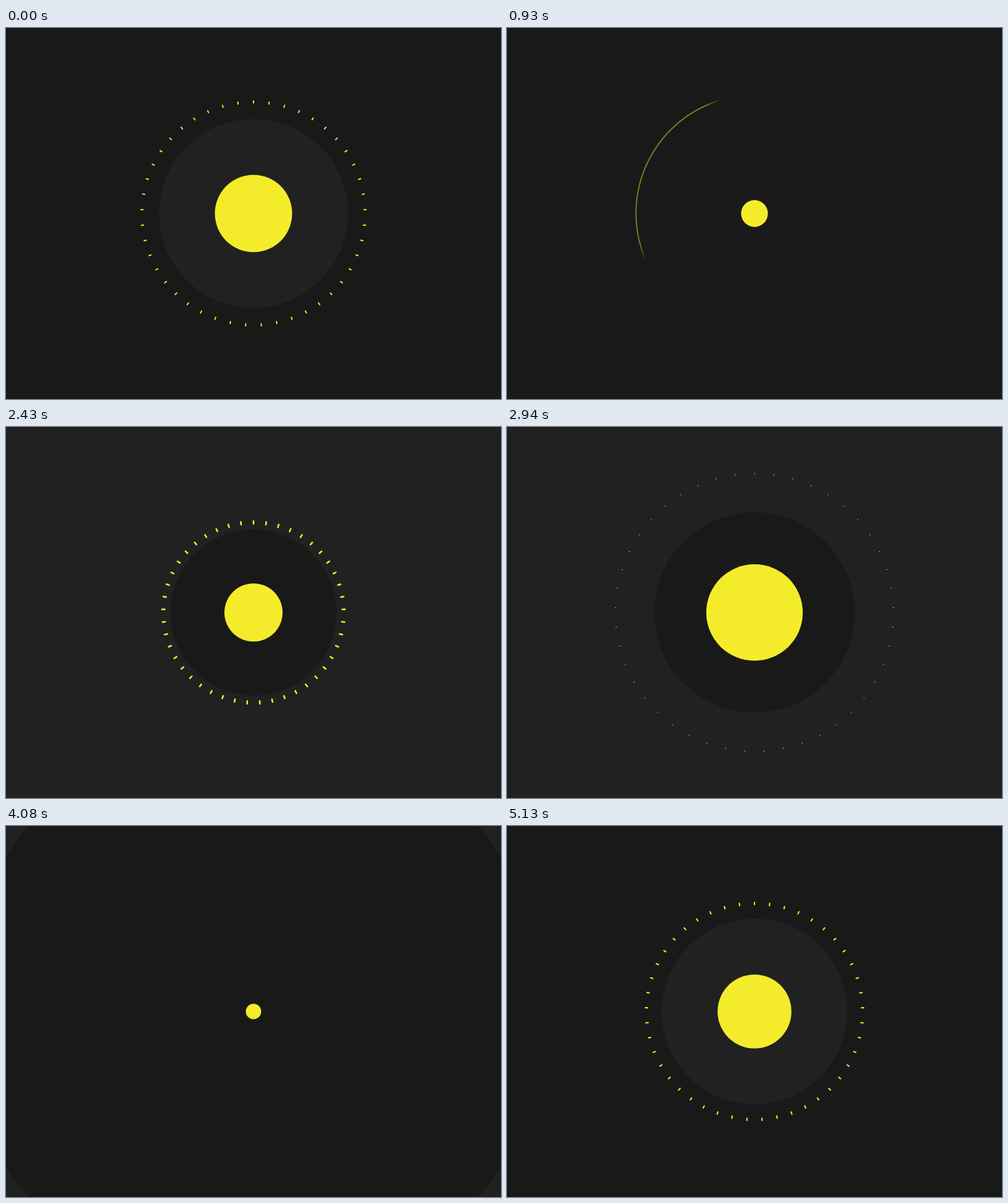
An HTML page with a canvas that plays this animation: 800x600 px, repeating every 5.16 s.

```html
<!DOCTYPE html>
<html lang="en">
<head>
<meta charset="utf-8">
<title>Pulse</title>
<style>
  html, body { margin: 0; width: 100%; height: 100%; overflow: hidden; background: #191919; }
  canvas { display: block; }
</style>
</head>
<body>
<canvas id="stage" width="800" height="600"></canvas>
<script>
const ctx = document.getElementById('stage').getContext('2d');
const YELLOW = '#f4ec2b', DARK = '#191919', GRAY = '#212121';
const TAU = Math.PI * 2, RAD = Math.PI / 180;
const CYCLE = 2580, SWITCH = 1605, START = 480;

const sinOut = x => Math.sin(x * Math.PI / 2);
const quartOut = x => 1 - (1 - x) ** 4;
const quadInOut = x => x < .5 ? 2 * x * x : 1 - 2 * (1 - x) ** 2;
const linear = x => x;

// Eased progress from 0 to 1 that begins at `start` and lasts `length` ms.
const progress = (t, start, length, ease = linear) =>
  ease(Math.min(1, Math.max(0, (t - start) / length)));

// Smooth monotone curve through [time, value] points.
function curve(points) {
  const secants = points.slice(1).map(([x, y], i) => (y - points[i][1]) / (x - points[i][0]));
  const slopes = points.map((_, i) => {
    const a = secants[i - 1] ?? secants[i], b = secants[i] ?? secants[i - 1];
    return 2 * a * b / (a + b);
  });
  return t => {
    const i = Math.max(0, Math.min(points.length - 2, points.findIndex(p => p[0] > t) - 1));
    const [x0, y0] = points[i], [x1, y1] = points[i + 1];
    const h = x1 - x0, s = Math.min(1, Math.max(0, (t - x0) / h)), r = 1 - s;
    return y0 * (1 + 2 * s) * r * r + y1 * s * s * (3 - 2 * s)
      + h * s * r * (slopes[i] * r - slopes[i + 1] * s);
  };
}

const tickRadius = curve([
  [START, 0], [555, 21.5], [675, 84.5], [825, 145.4], [945, 174.5],
  [975, 180.2], [1095, 199.7], [1545, 240], [1635, 243.5], [1980, 250]
]);

function disc(radius, color) {
  if (radius <= 0) return;
  ctx.fillStyle = color;
  ctx.beginPath();
  ctx.arc(0, 0, radius, 0, TAU);
  ctx.fill();
}

function drawTicks(t) {
  const length = 12.2 * (1 - progress(t, START, 1500)) ** 2;
  if (t <= START || length < .02) return;
  const width = length * .36, half = (length - width) / 2, radius = tickRadius(t);
  ctx.strokeStyle = YELLOW;
  ctx.lineWidth = width;
  ctx.lineCap = 'round';
  ctx.beginPath();
  for (let i = 0; i < 45; i++) {
    const a = i * 8 * RAD, x = Math.sin(a), y = -Math.cos(a);
    ctx.moveTo(x * (radius - half), y * (radius - half));
    ctx.lineTo(x * (radius + half), y * (radius + half));
  }
  ctx.stroke();
}

function drawArc(t) {
  const alpha = .45 * progress(t, 1365, 150) * (1 - progress(t, 2025, 150));
  if (!alpha) return;
  const span = 97 * RAD, fade = 8 / 360;
  ctx.save();
  ctx.rotate((3.7 + (t - 1545) * .424) * RAD);
  const paint = ctx.createConicGradient(0, 0, 0);
  const clear = 'rgba(244,236,43,0)';
  paint.addColorStop(0, clear);
  paint.addColorStop(fade, YELLOW);
  paint.addColorStop(97 / 360 - fade, YELLOW);
  paint.addColorStop(97 / 360, clear);
  paint.addColorStop(1, clear);
  ctx.globalAlpha = alpha;
  ctx.strokeStyle = paint;
  ctx.lineWidth = 2;
  ctx.lineCap = 'butt';
  ctx.beginPath();
  ctx.arc(0, 0, 191.5, 0, span);
  ctx.stroke();
  ctx.restore();
}

function dotRadius(t) {
  if (t < START) return 12.5 * (1 - progress(t, 0, 375, quadInOut));
  return 78 * progress(t, START, 840, sinOut) - 65.5 * progress(t, 1389, 703, quadInOut);
}

function draw(now) {
  const time = now % (2 * CYCLE);
  const t = (time + 2 * CYCLE - SWITCH) % CYCLE;
  const inverted = time >= SWITCH && time < SWITCH + CYCLE;
  const [back, front] = inverted ? [GRAY, DARK] : [DARK, GRAY];

  ctx.setTransform(1, 0, 0, 1, 0, 0);
  ctx.fillStyle = back;
  ctx.fillRect(0, 0, 800, 600);
  ctx.translate(400, 300);

  disc(162 * progress(t, START, 970, quartOut) * (1 - progress(t, 1445, 330, quadInOut)), front);
  disc(487 * progress(t, 2062, 473, quadInOut), front);
  drawTicks(t);
  drawArc(t);
  disc(dotRadius(t), YELLOW);
}

function loop() {
  draw(performance.now());
  requestAnimationFrame(loop);
}
loop();
</script>
</body>
</html>
```
